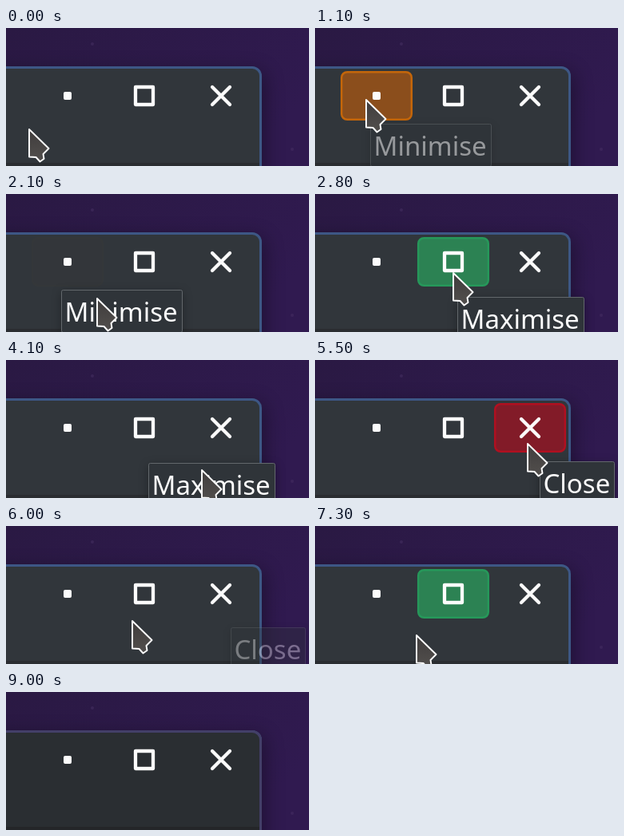
Animation of 379x173 px, one loop 9100 ms. Source, as an HTML page:

```html
<!DOCTYPE html>
<html lang="en">
<head>
<meta charset="utf-8">
<title>Window buttons</title>
<style>
  html, body { margin: 0; width: 100%; height: 100%; overflow: hidden; background: #2e1a4a; }
  svg { display: block; width: 379px; height: 173px; }
  .frame { stroke-width: 3; }
  .active .frame { fill: #31363b; stroke: #3d5785; }
  .active .body { fill: #2a2d31; }
  .inactive .frame { fill: #2a2e32; stroke: #433f68; }
  .inactive .body { fill: #242629; }
  .hover { stroke-width: 2.5; }
  .tip { filter: drop-shadow(0 3px 6px rgba(0, 0, 0, 0.3)); }
  .tip rect { fill: #2f3439; stroke: #63686c; }
  .tip text { font: 33px "Noto Sans", "Open Sans", sans-serif; fill: #fcfcfc; }
  .icon { fill: none; stroke: #fcfcfc; stroke-width: 4.3; stroke-linecap: round; stroke-linejoin: round; }
  #cursor { fill: url(#steel); stroke: #fff; stroke-width: 1.9; stroke-linejoin: round; }
</style>
</head>
<body>
<svg viewBox="0 0 379 173">
  <defs>
    <linearGradient id="sky" x1="0" y1="0" x2="1" y2="0.5">
      <stop offset="0" stop-color="#2a1943"/>
      <stop offset="1" stop-color="#301a50"/>
    </linearGradient>
    <linearGradient id="steel" x1="0" y1="0" x2="0" y2="1">
      <stop offset="0" stop-color="#403d3d"/>
      <stop offset="1" stop-color="#524f4d"/>
    </linearGradient>
    <filter id="soft" x="-20%" y="-20%" width="140%" height="140%">
      <feGaussianBlur stdDeviation="12"/>
    </filter>
  </defs>

  <rect width="379" height="173" fill="url(#sky)"/>
  <g fill="#4b3468" opacity="0.45">
    <circle cx="108" cy="20" r="2"/>
    <circle cx="358" cy="152" r="2"/>
  </g>
  <rect x="-40" y="54" width="364" height="220" rx="10" opacity="0.35" filter="url(#soft)"/>

  <g class="active">
    <rect class="frame" x="-20" y="49.5" width="338.5" height="200" rx="10.5"/>
    <rect class="body" y="169" width="317" height="4"/>
  </g>
  <g class="inactive" id="inactive">
    <rect class="frame" x="-20" y="49.5" width="338.5" height="200" rx="10.5"/>
    <rect class="body" y="169" width="317" height="4"/>
  </g>

  <g id="hovers"></g>

  <rect x="72" y="80" width="10" height="10" rx="2" fill="#fcfcfc"/>
  <rect class="icon" x="162" y="74" width="22" height="22"/>
  <path class="icon" d="M258 74l22 22M280 74l-22 22"/>

  <g id="tips"></g>
  <path id="cursor" d="M0 0V34.5L8.5 35L13.5 40.5L18.5 37L17.5 31L24.5 24Z"/>
</svg>

<script>
const LOOP = 9100, STEP = 100;
const byId = id => document.getElementById(id);
const clamp = v => Math.min(1, Math.max(0, v));
const ease = p => p * p * (3 - 2 * p);

// Where the pointer rests.
const start = [29, 127], onMin = [64, 90], onMax = [173, 99], onClose = [276, 97],
      onMaxAgain = [157, 94], away = [-30, 150];

// Each move is a cubic curve run with the same easing.
const moves = [
  { from: 100, to: 700, curve: [start, start, onMin, onMin] },
  { from: 1700, to: 2400, curve: [onMin, [100, 145], [100, 145], onMax] },
  { from: 3400, to: 4400, curve: [onMax, [217, 178], [217, 178], onClose] },
  { from: 5200, to: 6200, curve: [onClose, [290, 89], [146, 195], onMaxAgain] },
  { from: 7100, to: 7900, curve: [onMaxAgain, [96, 219], [20, 110], away] }
];

const layers = [];
function addLayer(parent, markup, ...spans) {
  byId(parent).insertAdjacentHTML("beforeend", markup);
  layers.push({ node: byId(parent).lastElementChild, spans });
}

function addHover(index, fill, stroke, ...spans) {
  addLayer("hovers", `<rect class="hover" x="${33.2 + 96 * index}" y="55.2" width="87.6"
    height="59.6" rx="7" fill="${fill}" stroke="${stroke}"/>`, ...spans);
}

// A tooltip opens at a fixed offset from the resting pointer.
function addTip(label, [x, y], width, span) {
  addLayer("tips", `<g class="tip" transform="translate(${x + 5} ${y + 30})">
    <rect x="0.5" y="0.5" width="${width - 1}" height="53" rx="2"/>
    <text x="4.5" y="40">${label}</text></g>`, span);
}

const hoverSpan = (on, off) => ({ on, off, rise: 200, fall: 350 });
const tipSpan = (on, off, fall) => ({ on, off, rise: 200, fall });

addHover(0, "#8b4e1c", "#c4660a", hoverSpan(300, 1800));
addHover(1, "#2c8253", "#26985a", hoverSpan(2200, 3600), hoverSpan(6000, 7300));
addHover(2, "#821b28", "#b01020", hoverSpan(4200, 5500));
addTip("Minimise", onMin, 152, tipSpan(1000, 2600, 200));
addTip("Maximise", onMax, 159, tipSpan(2600, 4200, 400));
addTip("Close", onClose, 94, tipSpan(4500, 5800, 500));
addTip("Maximise", onMaxAgain, 159, tipSpan(6600, 6800, 200));
layers.push({ node: byId("inactive"), spans: [{ on: 8700, off: LOOP, rise: 300, fall: 1 }] });

function opacityAt({ on, off, rise, fall }, t) {
  const left = 1 - clamp((t - off) / fall);
  return clamp((t - on) / rise) * left * left;
}

function pointerAt(t) {
  const move = moves.findLast(m => t >= m.from) || moves[0];
  const s = ease(clamp((t - move.from) / (move.to - move.from))), r = 1 - s;
  const [a, b, c, d] = move.curve;
  return [0, 1].map(i =>
    r * r * r * a[i] + 3 * r * r * s * b[i] + 3 * r * s * s * c[i] + s * s * s * d[i]);
}

function draw(t) {
  const [x, y] = pointerAt(t).map(Math.round);
  byId("cursor").setAttribute("transform", `translate(${x} ${y})`);
  for (const { node, spans } of layers)
    node.style.opacity = Math.max(...spans.map(span => opacityAt(span, t)));
}

const origin = performance.now();
function tick() {
  const t = (performance.now() - origin + 1) % LOOP;
  draw(Math.floor(t / STEP) * STEP);
  requestAnimationFrame(tick);
}
tick();
</script>
</body>
</html>
```
